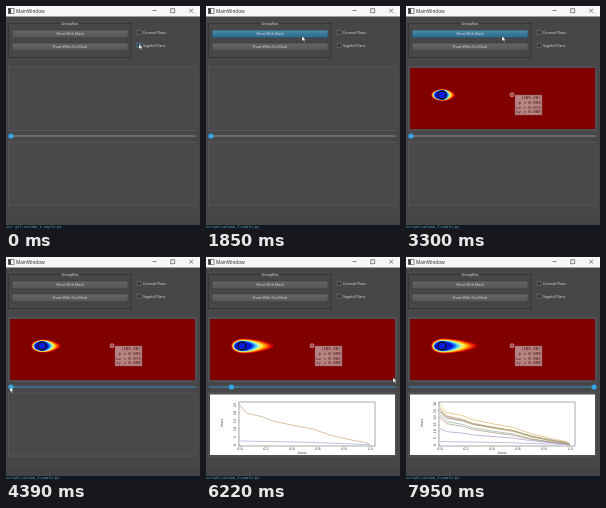
Animation of 194 by 223 pixels, one loop 8000 ms. Source, as an HTML page:

```html
<!DOCTYPE html>
<html lang="en">
<head>
<meta charset="utf-8">
<title>MainWindow</title>
<style>
  html, body { margin: 0; width: 100%; height: 100%; overflow: hidden; background: #474648; }
  svg { display: block; width: 194px; height: 223px; }
  text { font-family: "Open Sans", sans-serif; font-size: 3.6px; fill: #dedede; }
  .mid { text-anchor: middle; }
  .mono { font-family: "DejaVu Sans Mono", monospace; font-size: 4.1px; fill: #401818; white-space: pre; }
  .tick { font-family: "DejaVu Sans", sans-serif; font-size: 3.4px; fill: #333; text-anchor: middle; }
  .panel { fill: #49484b; stroke: #5c5b5e; stroke-width: .7; }
</style>
</head>
<body>
<svg viewBox="0 0 194 223">
  <defs>
    <linearGradient id="face" x2="0" y2="1">
      <stop stop-color="#666567"/><stop offset="1" stop-color="#545355"/>
    </linearGradient>
    <linearGradient id="hot" x2="0" y2="1">
      <stop stop-color="#4d8cad"/><stop offset="1" stop-color="#286587"/>
    </linearGradient>
  </defs>
  <rect width="194" height="223" fill="#474648"/>
  <rect width="194" height="10.5" fill="#f7f7f7"/>
  <rect x="2.5" y="2.5" width="5.5" height="5" fill="#fff" stroke="#555" stroke-width=".7"/>
  <rect x="2.5" y="2.5" width="2.4" height="5" fill="#333"/>
  <text x="10" y="6.5" style="font-size:4.7px;fill:#222">MainWindow</text>
  <path d="M146.5 4.5h4M164.7 2.7h4v4h-4zM183.2 2.7l4 4m0-4l-4 4" fill="none" stroke="#333" stroke-width=".6"/>

  <rect x="2.5" y="17.5" width="122.5" height="34" fill="none" stroke="#343335" stroke-width=".9"/>
  <rect x="55" y="15" width="18" height="5" fill="#474648"/>
  <text class="mid" x="64" y="18.6">GroupBox</text>
  <g stroke="#333" stroke-width=".5">
    <rect id="mask" x="6" y="24" width="116" height="8" rx="1"/>
    <rect x="6" y="37" width="116" height="8" rx="1" fill="url(#face)"/>
  </g>
  <text class="mid" x="64" y="29.3">Show With-Mask</text>
  <text class="mid" x="64" y="42.3">Show With-Out Mask</text>
  <g fill="#333" stroke="#777" stroke-width=".6">
    <rect x="131" y="24.7" width="4" height="4"/>
    <rect id="check" x="131" y="37.2" width="4" height="4"/>
  </g>
  <text x="137" y="28.4">Coronal Plane</text>
  <text x="137" y="40.7">Sagittal Plane</text>

  <rect class="panel" x="2.5" y="61" width="187.5" height="63.5"/>
  <rect class="panel" x="2.5" y="136" width="187.5" height="63"/>

  <g id="flow">
    <rect x="4" y="62" width="185" height="61" fill="#800000"/>
    <g id="plume"></g>
    <circle id="disc" cx="36" cy="89" r="3.9" stroke="#16100f" stroke-width="1.2"/>
    <circle cx="106" cy="88.7" r="2" fill="#a04c4c" stroke="#d8a5a5" stroke-width=".7"/>
    <rect x="109" y="89" width="27" height="20" fill="#b98383" stroke="#8e5151" stroke-width=".4"/>
    <g id="tip"></g>
  </g>

  <g id="chart">
    <rect x="4" y="137.5" width="185" height="60.5" fill="#fff"/>
    <rect x="33" y="145" width="136" height="44" fill="none" stroke="#555" stroke-width=".5"/>
    <g id="ticks"></g>
    <g id="curves" fill="none" stroke-width=".6" opacity=".85"></g>
  </g>

  <path id="groove" d="M3 130h187" stroke-width="1.3"/>
  <circle id="knob" cy="130" r="2.6" fill="#35a7e3"/>

  <rect y="210" width="194" height="9" fill="#444345"/>
  <rect y="219" width="194" height="4" fill="#101923"/>
  <text id="shell" class="mono" x="0" y="222.3" style="font-size:3.7px;fill:#5fa3ad"></text>
  <path id="cursor" d="M0 0v5l1.2-1 .9 1.9.9-.5-.9-1.7h1.6z" fill="#fff" stroke="#222" stroke-width=".3"/>
</svg>
<script>
const LOOP = 8000, STEP = 120;
const $ = id => document.getElementById(id);
const show = (id, on) => $(id).style.display = on ? '' : 'none';

// Runs of screen updates: [start, count]
const updates = [[0, 1], [500, 1], [750, 2], [1120, 4], [1850, 2], [2220, 13], [3910, 5],
  [4640, 4], [5250, 2], [5620, 9], [6830, 1], [7080, 2], [7450, 1], [7700, 1], [7950, 1]]
  .flatMap(([start, n]) => Array.from({ length: n }, (_, i) => start + i * STEP));

const pointer = [[0, 133, 38], [500, 133, 38], [1120, 112, 34], [1480, 96, 30], [3910, 96, 30],
  [4390, 4, 130], [5620, 4, 130], [5860, 21.5, 125.5], [6220, 187, 120.5], [8000, 187, 120.5]];
const reach = [[2220, 44, 5], [4390, 55, 6.6], [5860, 64, 7.3], [6220, 68, 7.4], [8000, 72, 7.5]];
const clicks = [6220, 6340, 6460, 6580, 6830, 7080, 7200, 7450, 7950];
const bands = ['#b40000', '#ee1c00', '#ff6400', '#ffae00', '#fdee48', '#c4f2b0', '#4cd2f0', '#1470ff', '#0616cc'];
const lines = ['#b58a4a', '#7f86c8', '#c9a227', '#6f8f62', '#c0625c', '#8c6db0', '#8c6a5e', '#777', '#a9a94a'];
const levels = [25, 2.5, 29, 22, 26, 12, 20, 24, 27];
const decay = [[0, 1], [.05, .8], [.18, .7], [.25, .6], [.44, .47], [.56, .4], [.7, .24], [.85, .13], [.97, .06], [1, .01]];

function sample(keys, t) {
  const i = keys.findIndex(k => k[0] > t);
  if (i < 0) return keys.at(-1).slice(1);
  if (!i) return keys[0].slice(1);
  const [a, b] = [keys[i - 1], keys[i]], f = (t - a[0]) / (b[0] - a[0]);
  return a.slice(1).map((v, j) => v + (b[j + 1] - v) * f);
}

// Blunt nose on the left, long rounded tail on the right
function blob(l, r, h) {
  const c = 37, m = c + (r - c) * .45;
  return `M${l} 89C${l} ${89 - h * .6} ${c - 5} ${89 - h} ${c} ${89 - h}C${m} ${89 - h} ${r} ${89 - h * .4} ${r} 89`
    + `C${r} ${89 + h * .4} ${m} ${89 + h} ${c} ${89 + h}C${c - 5} ${89 + h} ${l} ${89 + h * .6} ${l} 89`;
}

function drawPlume(t) {
  const [right, high] = sample(reach, t);
  $('plume').innerHTML = t < 2340 ? '' : bands.map((color, i) => {
    const k = 1 - i / (bands.length - 1);
    const tail = 38 + (right - 38) * (.28 + .72 * k);
    return `<path fill="${color}" d="${blob(28.5 - 3.5 * k, tail, 4.6 + (high - 4.6) * k)}"/>`;
  }).join('');
  $('disc').setAttribute('fill', t < 2340 ? '#720000' : '#0a1ee0');
}

function drawTip(t) {
  const p = t < 2340 ? '1.000' : t < 6220 ? '0.993' : '0.999';
  const u = t < 4640 ? '0.073' : t < 7450 ? '0.002' : '0.001';
  $('tip').innerHTML = ['  (109,40)', ' p = ' + p, 'ux = ' + u, 'uy = 0.000']
    .map((s, i) => `<text class="mono" x="110" y="${93.3 + i * 4.6}">${s}</text>`).join('');
}

function drawChart(n) {
  const top = n > 1 ? 30 : 25, scale = n > 1 ? 1.37 : 1.6;
  const yAt = v => 188 - v * scale;
  let marks = '<text class="tick" x="96" y="196.7">Xaxis</text><text class="tick" transform="translate(17 166) rotate(-90)">Yaxis</text>';
  for (let i = 0; i <= 5; i++) {
    const x = 34 + i * 26;
    marks += `<path d="M${x} 189v1" stroke="#555" stroke-width=".4"/><text class="tick" x="${x}" y="193">${(i / 5).toFixed(1)}</text>`;
  }
  for (let v = 0; v <= top; v += 5) {
    marks += `<path d="M32 ${yAt(v)}h1" stroke="#555" stroke-width=".4"/><text class="tick" transform="translate(29.5 ${yAt(v)}) rotate(-90)">${v}</text>`;
  }
  $('ticks').innerHTML = marks;
  $('curves').innerHTML = levels.slice(0, Math.min(n, 8) + 1).map((level, i) => {
    const bend = 1 + .12 * Math.sin(i * 2.4);
    const pts = i === 1
      ? [[0, 1], [.5, .7], [1, .1]].map(([x, y]) => `${34 + x * 130},${yAt(level * y)}`)
      : decay.map(([x, y]) => `${34 + x * 130},${yAt(level * y ** bend)}`);
    return `<polyline stroke="${lines[i]}" points="${pts.join(' ')}"/>`;
  }).join('');
}

function render(t) {
  const n = clicks.filter(c => c <= t).length;
  const [x, y] = sample(pointer, t);
  $('cursor').setAttribute('transform', `translate(${x} ${y})`);
  show('cursor', t < 7950);
  $('mask').setAttribute('fill', `url(#${t >= 1240 && t < 4030 ? 'hot' : 'face'})`);
  $('check').setAttribute('stroke', t < 750 ? '#4fa3cf' : '#777');
  $('groove').setAttribute('stroke', t < 4390 ? '#777' : '#387a9a');
  $('knob').setAttribute('cx', 5 + n * 20.35);
  $('shell').textContent = t < 750 ? 'int gif:volume_1-xepfs:py' : 'script\\volume_1\\xepfs:py';
  show('flow', t >= 2220);
  show('chart', n > 0);
  drawPlume(t);
  drawTip(t);
  if (n) drawChart(n);
}

const began = performance.now();
let shown = -1;
function tick() {
  const now = (performance.now() - began) % LOOP;
  const t = updates.findLast(u => u <= now) ?? 0;
  if (t !== shown) render(shown = t);
  requestAnimationFrame(tick);
}
tick();
</script>
</body>
</html>
```
